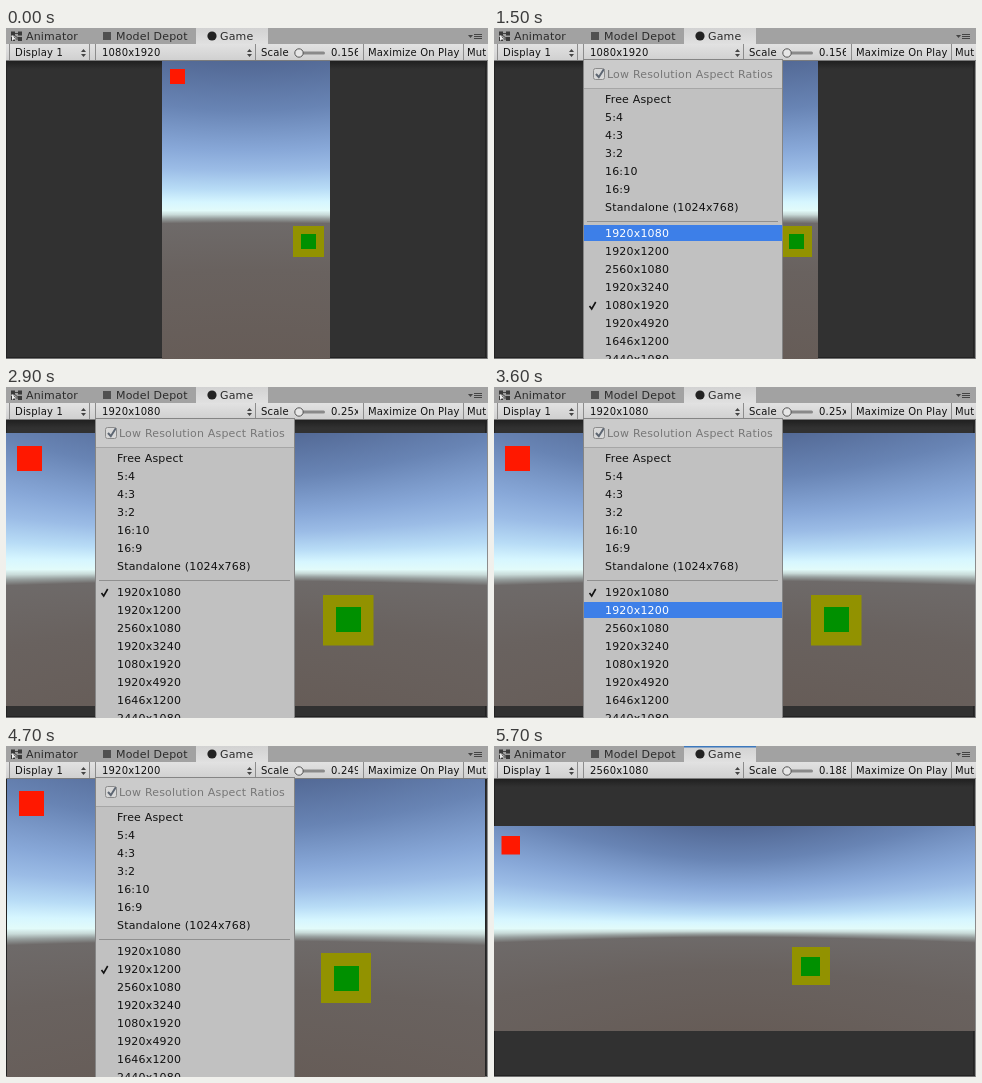
An HTML page with a canvas for the animation above (7.1 s loop, 482x331 px).

```html
<!DOCTYPE html>
<html lang="en">
<head>
<meta charset="utf-8">
<title>Game view resolution</title>
<style>
  html, body { margin: 0; width: 100%; height: 100%; overflow: hidden; background: #313131; }
  #stage { position: relative; width: 482px; height: 331px; overflow: hidden; }
  canvas, svg { position: absolute; left: 0; top: 0; display: block; }
  text { font-family: "DejaVu Sans", Verdana, sans-serif; font-size: 11px; letter-spacing: .18px; fill: #111; white-space: pre; }
  .bar text { font-size: 10px; letter-spacing: .18px; }
  .tab { fill: #2b2b2b; }
</style>
</head>
<body>
<div id="stage">
  <canvas id="view" width="482" height="331"></canvas>
  <svg id="ui" width="482" height="331" viewBox="0 0 482 331">
    <defs>
      <linearGradient id="tabFill" x2="0" y2="1"><stop stop-color="#d2d2d2"/><stop offset="1" stop-color="#e0e0e0"/></linearGradient>
      <linearGradient id="barFill" x2="0" y2="1"><stop stop-color="#e2e2e2"/><stop offset="1" stop-color="#cfcfcf"/></linearGradient>
      <clipPath id="scaleClip"><rect x="322" y="17" width="30" height="15"/></clipPath>
      <clipPath id="muteClip"><rect x="457" y="17" width="24" height="15"/></clipPath>
    </defs>

    <g id="tabs">
      <rect width="482" height="16" fill="#a2a2a2"/>
      <rect x="190" width="72" height="16" fill="url(#tabFill)"/>
      <rect id="focus" x="190" width="72" height="1.5" fill="#3c78bd"/>
      <path d="M8 5.5H13M8 11H13M7 6L13 11" stroke="#444" fill="none"/>
      <g fill="#3a3a3a">
        <rect x="5" y="3.5" width="4" height="4"/><rect x="12" y="3.5" width="4" height="4"/>
        <rect x="5" y="9" width="4" height="4"/><rect x="12" y="9" width="4" height="4"/>
      </g>
      <path d="M6 7v6l1.6-1.6 2.4 0z" fill="#eee"/>
      <rect x="97" y="4" width="8" height="8" fill="#505050"/>
      <circle cx="206" cy="8" r="4.6" fill="#222"/>
      <text class="tab" x="20" y="12">Animator</text>
      <text class="tab" x="110" y="12">Model Depot</text>
      <text class="tab" x="214" y="12">Game</text>
      <path d="M462 7h5l-2.5 3z" fill="#444"/>
      <path d="M468 6.5h8M468 8.5h8M468 10.5h8" stroke="#444"/>
    </g>

    <g class="bar">
      <rect y="16" width="482" height="17" fill="url(#barFill)"/>
      <rect y="32" width="482" height="1" fill="#7c7c7c"/>
      <path d="M3.5 16V32M83.5 16V32M89.5 16V32M249.5 16V32M357.5 16V32M457.5 16V32" stroke="#8c8c8c"/>
      <path d="M75 24l2.5-3 2.5 3zM75 26l2.5 3 2.5-3zM241 24l2.5-3 2.5 3zM241 26l2.5 3 2.5-3z" fill="#444"/>
      <text x="9" y="28">Display 1</text>
      <text id="size" x="96" y="28"></text>
      <text x="255" y="28">Scale</text>
      <rect x="291" y="23.5" width="28" height="3" rx="1.5" fill="#8a8a8a"/>
      <circle cx="293" cy="25" r="4.2" fill="#e6e6e6" stroke="#555"/>
      <g clip-path="url(#scaleClip)"><text id="scale" x="325" y="28"></text></g>
      <text x="362" y="28">Maximize On Play</text>
      <g clip-path="url(#muteClip)"><text x="461" y="28">Mute Audio</text></g>
    </g>

    <g id="menu">
      <rect x="89" y="31" width="200" height="302" fill="#858585"/>
      <rect x="90" y="32" width="198" height="300" fill="#c1c1c1"/>
      <rect x="90" y="32" width="198" height="28" fill="#cbcbcb"/>
      <path d="M90 60.5H288" stroke="#a6a6a6"/>
      <rect x="99.5" y="40.5" width="11" height="11" rx="2" fill="#d8d8d8" stroke="#8b8b8b"/>
      <path d="M102 46l2.8 3.2 5-8" fill="none" stroke="#5d6672" stroke-width="2"/>
      <text x="113" y="50" style="fill:#777">Low Resolution Aspect Ratios</text>
      <path d="M93 193.5H284" stroke="#909090"/>
      <rect id="hover" x="90" width="198" height="16" fill="#3d7fe8"/>
      <path id="tick" d="M95.5 0l2.2 3 4-7" fill="none" stroke="#111" stroke-width="1.6"/>
    </g>
  </svg>
</div>
<script>
const LOOP = 7100;
const ITEMS = ["Free Aspect", "5:4", "4:3", "3:2", "16:10", "16:9", "Standalone (1024x768)",
  "1920x1080", "1920x1200", "2560x1080", "1920x3240", "1080x1920", "1920x4920", "1646x1200", "2440x1080"];
const CLOSED = null, NONE = -1;

// box: x, y, w, h of the game picture; squares: x, y, side
const SCENES = [
  { item: 11, scale: "0.156x", box: [156, 33, 168, 299], red: [164, 41, 15], olive: [287, 198, 31], green: [295, 206, 15] },
  { item: 7, scale: "0.25x", box: [0, 46, 481, 273], red: [11, 59, 25], olive: [317, 208, 50.5], green: [330, 220, 25] },
  { item: 8, scale: "0.249x", box: [1, 33, 478, 299], red: [13, 45, 25], olive: [315, 207, 50], green: [328, 220, 25] },
  { item: 9, scale: "0.188x", box: [0, 80, 481, 205], red: [7.5, 90, 18.5], olive: [298, 201, 38], green: [307, 211, 19] }
];

// start time, scene, hovered menu row
const STEPS = [
  [0, 0, CLOSED], [700, 0, NONE], [1200, 0, 8], [1500, 0, 7],
  [2000, 1, CLOSED], [2900, 1, NONE], [3200, 1, 1], [3300, 1, 7], [3600, 1, 8],
  [3800, 2, CLOSED], [4700, 2, NONE], [4900, 2, 0], [5000, 2, 4], [5100, 2, 7], [5300, 2, 8], [5400, 2, 9],
  [5700, 3, CLOSED]
];

// sky colours by height, as a share of half the picture (down is positive)
const SKY = [
  [-1, "#526894"], [-.67, "#6884b4"], [-.4, "#88a8d8"], [-.27, "#9bbce6"], [-.14, "#b8dcf6"],
  [-.055, "#d6f6ff"], [0, "#e2fbfa"], [.027, "#c8dad8"], [.053, "#979f9e"], [.083, "#6e6a69"],
  [.4, "#69625f"], [1, "#665c57"]
];

const $ = id => document.getElementById(id);
const ctx = $("view").getContext("2d");
const rowY = i => 71 + 18 * i + (i > 6 ? 8 : 0);

const labels = ITEMS.map((name, i) => {
  const label = document.createElementNS("http://www.w3.org/2000/svg", "text");
  label.setAttribute("x", 111);
  label.setAttribute("y", rowY(i) + 4);
  label.textContent = name;
  $("menu").append(label);
  return label;
});

function fill(color, x, y, w, h) {
  ctx.fillStyle = color;
  ctx.fillRect(x, y, w, h);
}

function drawSurround() {
  fill("#313131", 0, 33, 482, 298);
  const shade = ctx.createLinearGradient(0, 33, 0, 41);
  shade.addColorStop(0, "#202020");
  shade.addColorStop(1, "#313131");
  fill(shade, 0, 33, 482, 8);
  fill("#232323", 0, 33, 1, 298);
  fill("#232323", 479, 33, 1, 298);
  fill("#232323", 0, 329, 482, 1);
  fill("#6f6f6f", 0, 330, 482, 1);
  fill("#8c8c8c", 481, 33, 1, 298);
}

// A 60 degree camera bends lines of equal height away from the middle
function drawSky([x, y, w, h]) {
  const half = h / 2, mid = y + half, tan = Math.tan(Math.PI / 6);
  for (let i = 0; i < w; i++) {
    const bend = Math.hypot(1, (i + .5 - w / 2) / half * tan);
    const reach = half * bend;
    const column = ctx.createLinearGradient(0, mid - reach, 0, mid + reach);
    for (const [at, color] of SKY) column.addColorStop((at + 1) / 2, color);
    fill(column, x + i, y, 1, h);
  }
}

function drawScene({ box, red, olive, green }) {
  drawSurround();
  drawSky(box);
  const square = (color, [x, y, side]) => fill(color, x, y, side, side);
  square("#ff1800", red);
  square("#929200", olive);
  square("#009000", green);
}

function show([, sceneIndex, row]) {
  const scene = SCENES[sceneIndex], open = row !== CLOSED;
  drawScene(scene);
  $("size").textContent = ITEMS[scene.item];
  $("scale").textContent = scene.scale;
  $("focus").style.display = sceneIndex > 0 && !open ? "" : "none";
  $("menu").style.display = open ? "" : "none";
  if (!open) return;
  $("hover").style.display = row === NONE ? "none" : "";
  if (row !== NONE) $("hover").setAttribute("y", rowY(row) - 8);
  $("tick").setAttribute("transform", `translate(0 ${rowY(scene.item) + 1})`);
  labels.forEach((label, i) => label.style.fill = i === row ? "#fff" : "");
}

let current;
function tick(now) {
  const t = now % LOOP;
  const step = STEPS.findLast(([start]) => start <= t);
  if (step !== current) show(current = step);
  requestAnimationFrame(tick);
}
tick(performance.now());
</script>
</body>
</html>
```
